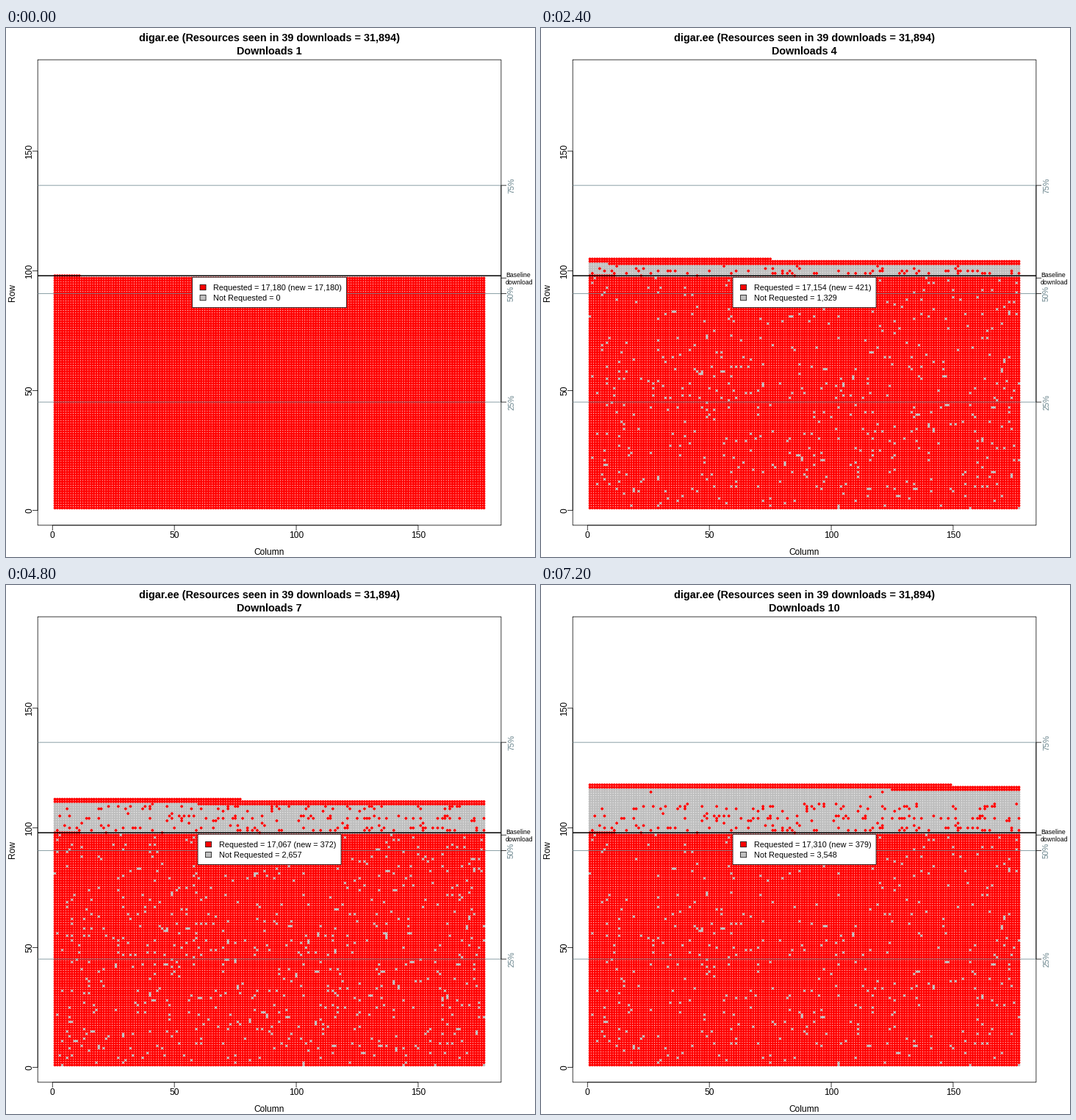
A matplotlib script for the animation above (8000 ms loop, 720x720 px).

```python
import numpy as np
import matplotlib
import matplotlib.pyplot as plt
from matplotlib.animation import FuncAnimation
from matplotlib.colors import to_rgba
from matplotlib.patches import Rectangle

matplotlib.rcParams["font.family"] = "Liberation Sans"

SIZE, DPI = 720, 72  # one point equals one pixel
COLS, ROWS = 177, 181
RED, GREY, SLATE = "#ff0000", "#bebebe", "#68838b"
LEFT, RIGHT, TOP, BOTTOM = 43.2, 673.9, 43.2, 676.8
MID = (LEFT + RIGHT) / 2
THIN, THICK, TICK = 0.75, 1.5, 7.2

# Resources first seen, and known ones left out, per download
NEW = [17180, 488, 394, 421, 421, 448, 372, 377, 378, 379]
MISSING = [0, 403, 852, 1329, 1610, 2024, 2657, 2772, 3140, 3548]
TOTAL = np.cumsum(NEW)
BASE = NEW[0]


def px(col):
    return LEFT + (col + 6.04) * (RIGHT - LEFT) / ((COLS - 1) * 1.08)


def py(row):
    return BOTTOM - (row + 6.2) * (BOTTOM - TOP) / ((ROWS - 1) * 1.08)


rng = np.random.default_rng(39)
index = np.arange(TOTAL[-1])
row = index // COLS + 1
centers = np.column_stack([px(index % COLS + 1), py(row)])

# Later resources survive in bands of rows, and hardly any above row 110
rate = 0.035 + 0.15 * np.cos(np.pi * (row - 99.5) / 4.5) ** 4
rate[row > 110] = 0.003
kept = rng.random(index.size) < rate
gap_order = rng.permutation(BASE)

fig = plt.figure(figsize=(SIZE / DPI, SIZE / DPI), dpi=DPI, facecolor="white")
ax = fig.add_axes([0, 0, 1, 1])
ax.set_xlim(0, SIZE)
ax.set_ylim(SIZE, 0)
ax.axis("off")


def line(xs, ys, color="black", lw=THIN, z=3):
    ax.plot(xs, ys, color=color, lw=lw, zorder=z, snap=False,
            solid_capstyle="butt", solid_joinstyle="miter")


def label(x, y, s, size=12, **kw):
    return ax.text(x, y, s, fontsize=size, zorder=6, va="baseline", **kw)


def upright(x, y, s, size=12, **kw):
    label(x, y, s, size, rotation=90, rotation_mode="anchor", ha="center",
          **kw)


def panel(y, w, h, color):
    box = Rectangle((0, y), w, h, facecolor=color, edgecolor="black",
                    lw=THIN, zorder=5, snap=False)
    return ax.add_patch(box)


dots = ax.scatter([], [], s=3.8 ** 2, linewidths=0, zorder=2)

# Frame and axes
line([LEFT, RIGHT, RIGHT, LEFT, LEFT], [TOP, TOP, BOTTOM, BOTTOM, TOP])
line([px(0), px(150)], [BOTTOM, BOTTOM])
line([LEFT, LEFT], [py(0), py(150)])
for v in range(0, 151, 50):
    line([px(v)] * 2, [BOTTOM, BOTTOM + TICK])
    label(px(v), 694, str(v), ha="center")
    line([LEFT - TICK, LEFT], [py(v)] * 2)
    upright(35, py(v), str(v))
label(MID, 717, "Column", ha="center")
upright(12, 360, "Row")

# Quartile guides and right axis
for share in (25, 50, 75):
    y = py(ROWS * share / 100)
    line([LEFT, RIGHT], [y, y], SLATE)
    line([RIGHT, RIGHT + TICK], [y, y])
    upright(691, y, f"{share}%", 10.8, color=SLATE)
line([RIGHT, RIGHT], [py(ROWS * 0.25), py(ROWS * 0.75)])
line([LEFT, RIGHT], [py(98)] * 2, lw=THICK, z=4)
line([RIGHT, RIGHT + TICK], [py(BASE / COLS)] * 2)
label(680, 339, "Baseline", 8.8)
label(680, 349, "download", 8.8)

# Title and legend
label(MID, 18, "digar.ee (Resources seen in 39 downloads = 31,894)", 14.4,
      ha="center", weight="bold")
title = label(MID, 36, "", 14.4, ha="center", weight="bold")
legend_box = panel(339.3, 0, 41.2, "white")
swatches = [panel(349.3, 8, 7.4, RED), panel(363.4, 8, 7.4, GREY)]
entries = [label(0, 357, "", 10.9), label(0, 371, "", 10.9)]


def grey_cells(i):
    """Mask of the known resources that download i did not request."""
    grey = np.zeros(TOTAL[i], bool)
    if i:
        old = slice(BASE, TOTAL[i - 1])
        grey[old] = ~kept[old]
        grey[gap_order[:MISSING[i] - grey.sum()]] = True
    return grey


def update(i):
    # Requested cells lie on top of the grey ones
    grey = grey_cells(i)
    order = np.argsort(~grey, kind="stable")
    dots.set_offsets(centers[order])
    dots.set_facecolors(np.where(grey[order, None], to_rgba(GREY),
                                 to_rgba(RED)))

    title.set_text(f"Downloads {i + 1}")
    entries[0].set_text(
        f"Requested = {TOTAL[i] - MISSING[i]:,} (new = {NEW[i]:,})")
    entries[1].set_text(f"Not Requested = {MISSING[i]:,}")
    width = 195 if NEW[i] < 1000 else 210
    x = MID - width / 2
    legend_box.set_x(x)
    legend_box.set_width(width)
    for swatch, entry in zip(swatches, entries):
        swatch.set_x(x + 10.5)
        entry.set_x(x + 28.6)
    return [dots, title, legend_box, *swatches, *entries]


anim = FuncAnimation(fig, update, frames=len(NEW), interval=800,
                     repeat=True, repeat_delay=0, blit=False)
plt.show()
```
